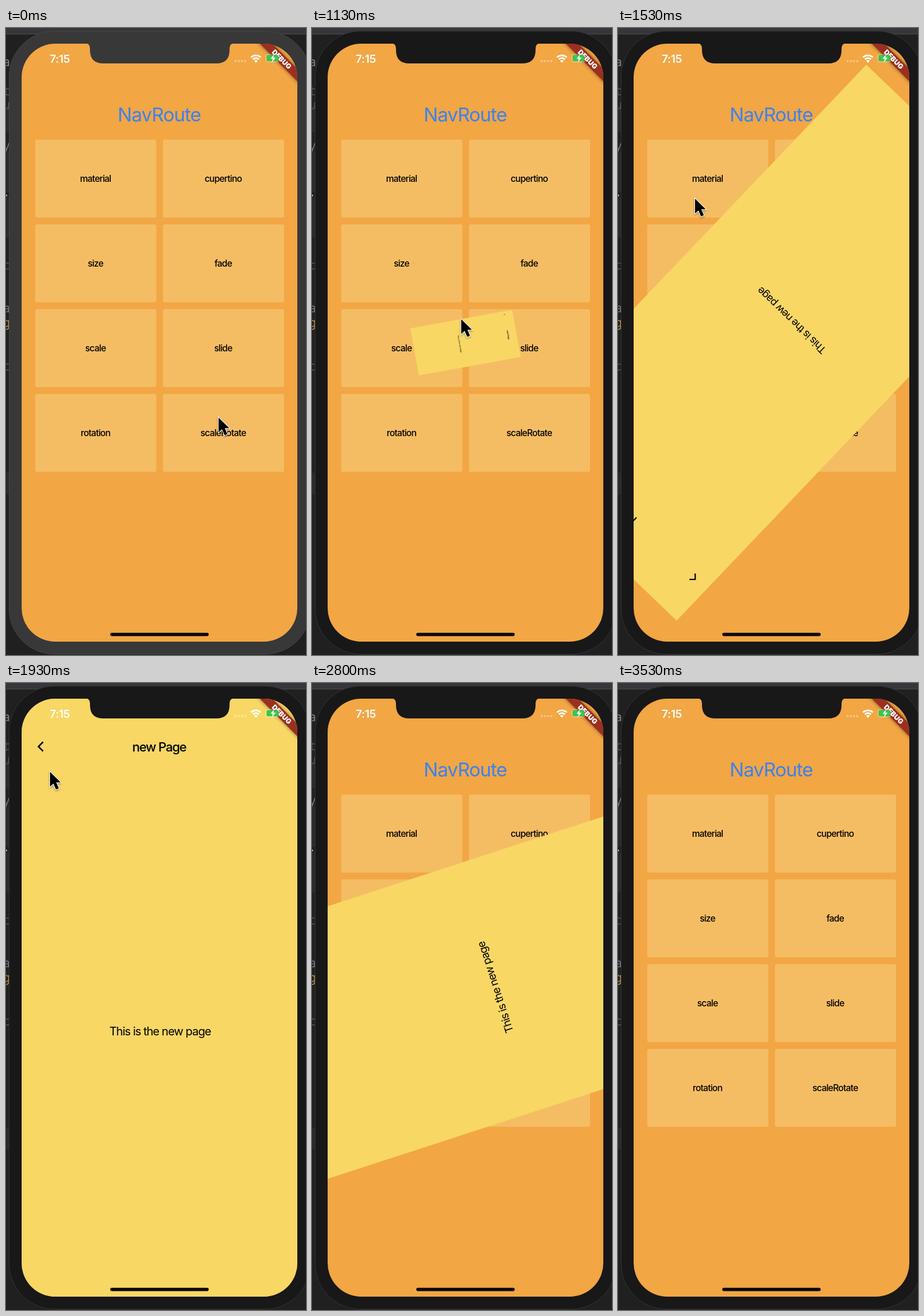
These frames come from a looping animation (518x1080 px, 3.59 s). An HTML page:

```html
<!DOCTYPE html>
<html lang="en">
<head>
<meta charset="utf-8">
<title>Route transition</title>
<style>
  html, body { margin: 0; height: 100%; overflow: hidden; background: #202021; }
  svg { display: block; width: 100%; height: 100%; }
  text { font-family: Inter, "Open Sans", sans-serif; text-anchor: middle; }
  .heading { font-size: 33px; letter-spacing: -1px; fill: #3b82f0; }
  .label { font-size: 15.5px; font-weight: 500; letter-spacing: -.76px; }
  .page-title { font-size: 22px; font-weight: 500; letter-spacing: -1.25px; }
  .page-body { font-size: 20px; letter-spacing: -1px; }
  .clock { font-size: 19px; font-weight: 600; letter-spacing: -.3px; fill: #fff; }
  .debug { font-size: 12px; font-weight: 900; fill: #fff; }
  .code text { font-size: 21px; text-anchor: end; font-family: "Noto Sans Mono", monospace; }
</style>
</head>
<body>
<svg viewBox="0 0 518 1080">
  <defs>
    <clipPath id="screen"><rect x="27" y="27" width="476" height="1030" rx="58"/></clipPath>
    <filter id="blur" x="-20%" y="-100%" width="140%" height="300%"><feGaussianBlur stdDeviation="3"/></filter>
    <filter id="shadow" x="-50%" y="-50%" width="200%" height="200%">
      <feDropShadow dx="0" dy="1.5" stdDeviation="1.5" flood-opacity=".4"/>
    </filter>
  </defs>

  <!-- Editor window behind the phone -->
  <g class="code" id="code">
    <path fill="#2a2a2b" d="M0 135H6V180H0zM0 213H6V282H0zM0 292H6V361H0zM0 766H6V803H0z"/>
    <path fill="#36373b" d="M0 0H518V10H0z"/>
    <path fill="none" stroke="#4a4a4d" d="M0 10.5H518"/>
  </g>

  <rect id="bezel" x="5.5" y="5.5" width="520" height="1073" rx="78"/>

  <g clip-path="url(#screen)">
    <path fill="#f2a644" d="M27 27H503V1057H27z"/>
    <text class="heading" x="264.5" y="161">NavRoute</text>
    <g id="cells"></g>

    <g id="page">
      <path fill="#f8d765" d="M27 27H503V1057H27z"/>
      <path d="M64 101.5L56 109.5L64 117.5" fill="none" stroke="#000" stroke-width="2.5"/>
      <text class="page-title" x="264.5" y="117.5">new Page</text>
      <text class="page-body" x="266" y="607">This is the new page</text>
    </g>

    <g transform="translate(503 27) rotate(45)">
      <path d="M-60 30.5H60V45.7H-60z" fill-opacity=".5" filter="url(#blur)"/>
      <path d="M-60 30.5H60V45.7H-60z" fill="#9c3020"/>
      <text class="debug" x="0" y="42.4">DEBUG</text>
    </g>
  </g>

  <path id="notch" d="M137 26Q145 27 145 35V38Q145 61 168 61H363Q386 61 386 38V35Q386 27 394 26z"/>
  <text class="clock" x="93" y="59.5">7:15</text>
  <g fill="#fff" fill-opacity=".35">
    <circle cx="396.5" cy="57" r="2"/><circle cx="402" cy="57" r="2"/>
    <circle cx="407.5" cy="57" r="2"/><circle cx="413" cy="57" r="2"/>
  </g>
  <g fill="none" stroke="#fff" stroke-width="2.7">
    <path d="M423 50.5A12.2 12.2 0 0 1 440 50.5M426.3 54A7.5 7.5 0 0 1 436.7 54"/>
    <path fill="#fff" stroke="none" d="M431.5 60L428.3 56.6A4.6 4.6 0 0 1 434.7 56.6z"/>
  </g>
  <rect x="448.8" y="45.5" width="23" height="13" rx="3.5" fill="none" stroke="#fff" stroke-opacity=".45"/>
  <rect x="450" y="46.8" width="20.5" height="10.4" rx="2" fill="#37c84f"/>
  <path d="M463 45L457 53H460.5L459 59.5L465.5 51H461.5z" fill="#fff"/>
  <rect x="180" y="1041.8" width="170" height="5.6" rx="2.8" fill="#0b0a08"/>

  <path id="cursor" d="M0 0V25.5L5.9 20.2L10.4 30.5L15.2 28.4L10.8 18.3H18.5z"
        stroke="#fff" stroke-width="2" paint-order="stroke" filter="url(#shadow)"/>
</svg>

<script>
const LOOP = 3590, PUSH = 912, POP = 2500, DURATION = 1000, ACTIVATE = 830;
const CENTER = [265, 542];
const byId = id => document.getElementById(id);
const clamp = v => Math.min(1, Math.max(0, v));

const labels = ["material", "cupertino", "size", "fade", "scale", "slide", "rotation", "scaleRotate"];
byId("cells").innerHTML = labels.map((label, i) => {
  const x = 50.5 + i % 2 * 220.5, y = 192.3 + (i >> 1) * 146;
  return `<rect x="${x}" y="${y}" width="209" height="134.3" rx="3" fill="#f5bd63"/>
    <text class="label" x="${x + 104}" y="${y + 72.5}">${label}</text>`;
}).join("");

const codeEdge = [
  ["a", 66, "#85858a"], ["t", 116, "#5d4a70"], ["u", 140, "#5d4a70"], ["y", 210, "#77777a"],
  [".", 290, "#aaa"], ["c", 416, "#4d4a70"], ["a", 490, "#77777c"], ["g", 515, "#b58a3c"], ["c", 590, "#5d4a70"]
];
byId("code").innerHTML += codeEdge.map(([glyph, y, color]) =>
  `<text x="7" y="${y}" fill="${color}">${glyph}</text>`).join("");

// Cubic Bezier ease (0.4, 0, 0.2, 1), solved by bisection
function fastOutSlowIn(x) {
  let low = 0, high = 1, s;
  for (let i = 0; i < 24; i++) {
    s = (low + high) / 2;
    const bx = 1.2 * s * (1 - s) ** 2 + .6 * s * s * (1 - s) + s ** 3;
    if (bx < x) low = s; else high = s;
  }
  return 3 * s * s * (1 - s) + s ** 3;
}

// Pointer stops: time, x, y
const stops = [
  [0, 367, 671], [600, 360, 682], [930, 360, 682], [1333, 158, 326], [1533, 133, 294],
  [1933, 76, 153], [2200, 59, 110], [2500, 59, 110], [2740, -30, -40], [LOOP, -30, -40]
];
function pointerAt(time) {
  const i = stops.findIndex(stop => stop[0] > time);
  const [t0, x0, y0] = stops[i - 1], [t1, x1, y1] = stops[i];
  const u = (time - t0) / (t1 - t0), k = u * u * (3 - 2 * u);
  return [x0 + (x1 - x0) * k, y0 + (y1 - y0) * k];
}

function draw(time) {
  const progress = clamp((time - PUSH) / DURATION) - clamp((time - POP) / DURATION);
  const scale = fastOutSlowIn(progress);
  const page = byId("page");
  page.style.display = progress > 0 ? "" : "none";
  page.setAttribute("transform",
    `translate(${CENTER}) rotate(${progress * 360}) scale(${scale}) translate(${CENTER.map(v => -v)})`);

  const active = time >= ACTIVATE, body = active ? "#181818" : "#383838";
  byId("bezel").setAttribute("fill", body);
  byId("bezel").setAttribute("stroke", active ? "#343434" : "#464646");
  byId("notch").setAttribute("fill", body);
  byId("cursor").setAttribute("transform", `translate(${pointerAt(time)})`);
}

function tick() {
  const step = Math.floor((performance.now() % LOOP + 4) * 0.015);
  draw(step * 200 / 3);
  requestAnimationFrame(tick);
}
tick();
</script>
</body>
</html>
```
